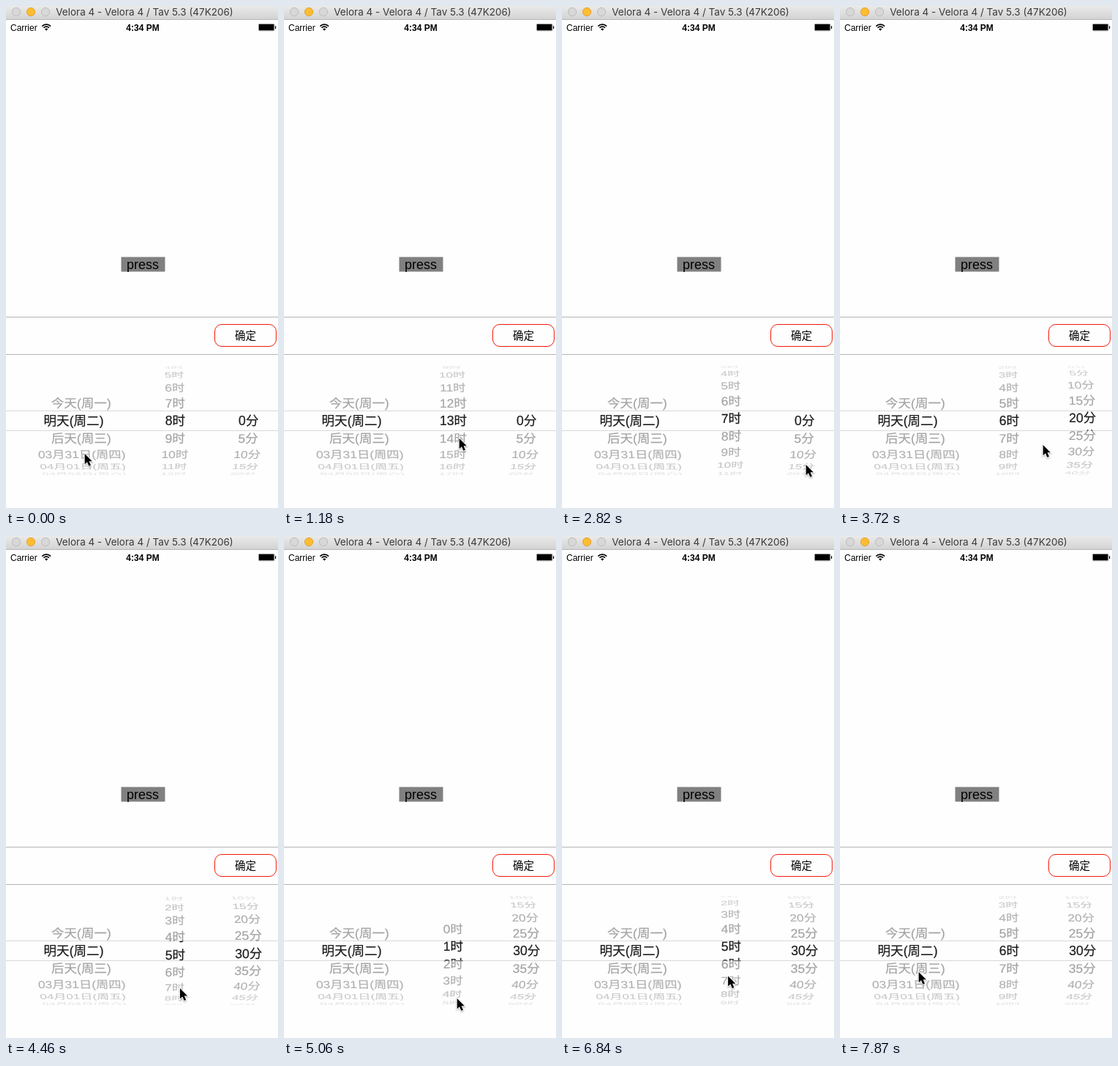
An HTML page with a canvas that plays this animation: 372 by 685 pixels, repeating every 8 s.

```html
<!DOCTYPE html>
<html lang="zh-CN">
<head>
<meta charset="utf-8">
<style>
  html, body { margin: 0; height: 100%; overflow: hidden; background: #fefefe; }
  canvas { display: block; }
</style>
</head>
<body>
<canvas id="stage" width="372" height="685"></canvas>
<script>
const ctx = document.getElementById('stage').getContext('2d');
const LOOP = 8000, TICK = 148.6;
const SANS = '"Liberation Sans", "Noto Sans CJK SC", "Noto Sans CJK", sans-serif';

// Wheel geometry
const MID = 566, RADIUS = 75.6, PITCH = 18.5 * Math.PI / 180, VANISH_X = 186, DEPTH = 0.07;
const BAND = [552.5, 579.5];

// Keys are [tick, ...values]; a trailing 'fling' decelerates towards the next key.
const hourKeys = [[2, 8], [4, 9.6, 'fling'], [11, 13.4], [12, 13.3], [13, 12.9], [14, 11.7, 'fling'],
  [25, 6], [27, 6], [31, 4.37, 'fling'], [39, 0], [41, 0], [43, 1.3, 'fling'], [49, 6]];
const minuteKeys = [[19, 0], [22, 1.79, 'fling'], [33, 6]];
const cursorKeys = [[0, 108, 611], [2, 243, 620], [5, 240, 582], [8, 240, 590], [11, 242, 606],
  [14, 244, 646], [15, 280, 644], [16, 325, 638], [19, 334, 626], [22, 331, 575], [23, 328, 580],
  [25, 278, 599], [27, 242, 588], [31, 237, 627], [34, 237, 631], [38, 235, 630], [41, 234, 629],
  [44, 229, 602], [49, 225, 598], [50, 160, 590], [51, 108, 580], [52, 108, 580], [53, 108, 595]];

function track(keys, n) {
  const next = keys.findIndex(k => k[0] > n);
  if (next === 0) return keys[0].slice(1);
  if (next < 0) return keys[keys.length - 1].slice(1);
  const a = keys[next - 1], b = keys[next];
  let u = (n - a[0]) / (b[0] - a[0]);
  if (a.includes('fling')) u = 1 - (1 - u) ** 2.65;
  return b.slice(1).map((v, i) => (v === 'fling' ? v : a[i + 1] + (v - a[i + 1]) * u));
}

const days = ['今天(周一)', '明天(周二)', '后天(周三)', '03月31日(周四)', '04月01日(周五)', '04月02日(周六)'];
const hours = Array.from({ length: 24 }, (_, i) => i + '时');
const minutes = Array.from({ length: 12 }, (_, i) => i * 5 + '分');

function text(str, x, y, font, color = '#000', align = 'center') {
  ctx.font = font;
  ctx.fillStyle = color;
  ctx.textAlign = align;
  ctx.fillText(str, x, y);
}

function hLine(y, color) {
  ctx.fillStyle = color;
  ctx.fillRect(0, y, 372, 1);
}

function dot(x, fill, edge) {
  ctx.beginPath();
  ctx.arc(x, 8, 5.6, 0, 7);
  ctx.fillStyle = fill;
  ctx.fill();
  ctx.strokeStyle = edge;
  ctx.lineWidth = 1;
  ctx.stroke();
}

function drawRows(rows, pos, x, selected) {
  rows.forEach((label, i) => {
    const angle = (i - pos) * PITCH, c = Math.cos(angle), s = Math.sin(angle);
    if (Math.abs(angle) > 1.5) return;
    const scale = 1 - DEPTH * (1 - c);
    const grey = Math.round(254 - 96 * c);
    const color = selected ? '#1c1c1c' : `rgb(${grey},${grey},${grey})`;
    ctx.save();
    ctx.transform(scale, 0, -(x - VANISH_X) * DEPTH * s / RADIUS, c,
      VANISH_X + (x - VANISH_X) * scale, MID + RADIUS * s);
    text(label, 0, 6.4, '17.6px ' + SANS, color);
    ctx.strokeStyle = color;
    ctx.lineWidth = 0.2;
    ctx.strokeText(label, 0, 6.4);
    ctx.restore();
  });
}

function drawWheel(rows, pos, x, selectedX = x) {
  const clipped = (bands, selected) => {
    ctx.save();
    ctx.beginPath();
    bands.forEach(([top, bottom]) => ctx.rect(0, top, 372, bottom - top));
    ctx.clip();
    drawRows(rows, pos, selected ? selectedX : x, selected);
    ctx.restore();
  };
  clipped([[491, BAND[0]], [BAND[1], 640]], false);
  clipped([BAND], true);
}

function drawTitleBar() {
  const g = ctx.createLinearGradient(0, 0, 0, 18);
  g.addColorStop(0, '#eaeaea');
  g.addColorStop(1, '#d3d3d3');
  ctx.fillStyle = g;
  ctx.fillRect(0, 0, 372, 18);
  hLine(18, '#b8b8b8');
  dot(14, '#d8d8d8', '#bcbcbc');
  dot(34, '#fdbd2f', '#e0a23a');
  dot(54, '#d8d8d8', '#bcbcbc');
  text('Velora 4 - Velora 4 / Tav 5.3 (47K206)', 189.5, 13, '13.5px Inter, sans-serif', '#3a3a3a');
}

function drawStatusBar() {
  text('Carrier', 6, 34, '12px ' + SANS, '#000', 'left');
  text('4:34 PM', 187, 34, 'bold 12px ' + SANS);
  ctx.strokeStyle = '#000';
  ctx.lineWidth = 1.7;
  for (const r of [8.3, 5.3]) {
    ctx.beginPath();
    ctx.arc(55.2, 33.5, r, -2.36, -0.78);
    ctx.stroke();
  }
  ctx.beginPath();
  ctx.moveTo(55.2, 33.7);
  ctx.arc(55.2, 33.7, 3, -2.36, -0.78);
  ctx.fill();
  ctx.strokeStyle = '#777';
  ctx.lineWidth = 0.7;
  ctx.beginPath();
  ctx.roundRect(345.4, 24.4, 21.6, 9.4, 1.5);
  ctx.stroke();
  ctx.fillRect(346, 25, 20.4, 8.2);
  ctx.fillRect(368, 27.4, 1.2, 3.6);
}

function drawPage() {
  ctx.fillStyle = '#808080';
  ctx.fillRect(157.5, 342.5, 60, 20);
  text('press', 187, 358.5, '18px ' + SANS);
  hLine(424, '#b4b4b4');
  hLine(475, '#b4b4b4');
  ctx.strokeStyle = '#f5190b';
  ctx.lineWidth = 1;
  ctx.beginPath();
  ctx.roundRect(285.5, 434.5, 84, 30, 9.5);
  ctx.stroke();
  text('确定', 327.5, 454.7, '300 14.6px ' + SANS);
  hLine(552, '#d9d9d9');
  hLine(579, '#d9d9d9');
}

const arrow = new Path2D('M0 0V14.2L3.3 11.2L5.7 16.8L8.3 15.7L5.9 10.3H10.2Z');
function drawCursor([x, y]) {
  ctx.save();
  ctx.translate(x - 0.3, y);
  ctx.shadowColor = 'rgba(0,0,0,.35)';
  ctx.shadowBlur = 2;
  ctx.shadowOffsetY = 1;
  ctx.strokeStyle = '#fff';
  ctx.lineWidth = 1.8;
  ctx.stroke(arrow);
  ctx.shadowColor = 'transparent';
  ctx.fillStyle = '#000';
  ctx.fill(arrow);
  ctx.restore();
}

function draw(ms) {
  const n = Math.floor((ms % LOOP + 10) / TICK);
  ctx.fillStyle = '#fefefe';
  ctx.fillRect(0, 0, 372, 685);
  drawTitleBar();
  drawStatusBar();
  drawPage();
  drawWheel(days, 1, 102.5, 92.5);
  drawWheel(hours, track(hourKeys, n)[0], 231.5);
  drawWheel(minutes, track(minuteKeys, n)[0], 331.8);
  drawCursor(track(cursorKeys, n));
}

const start = performance.now();
(function loop() {
  draw(performance.now() - start);
  requestAnimationFrame(loop);
})();
</script>
</body>
</html>
```
